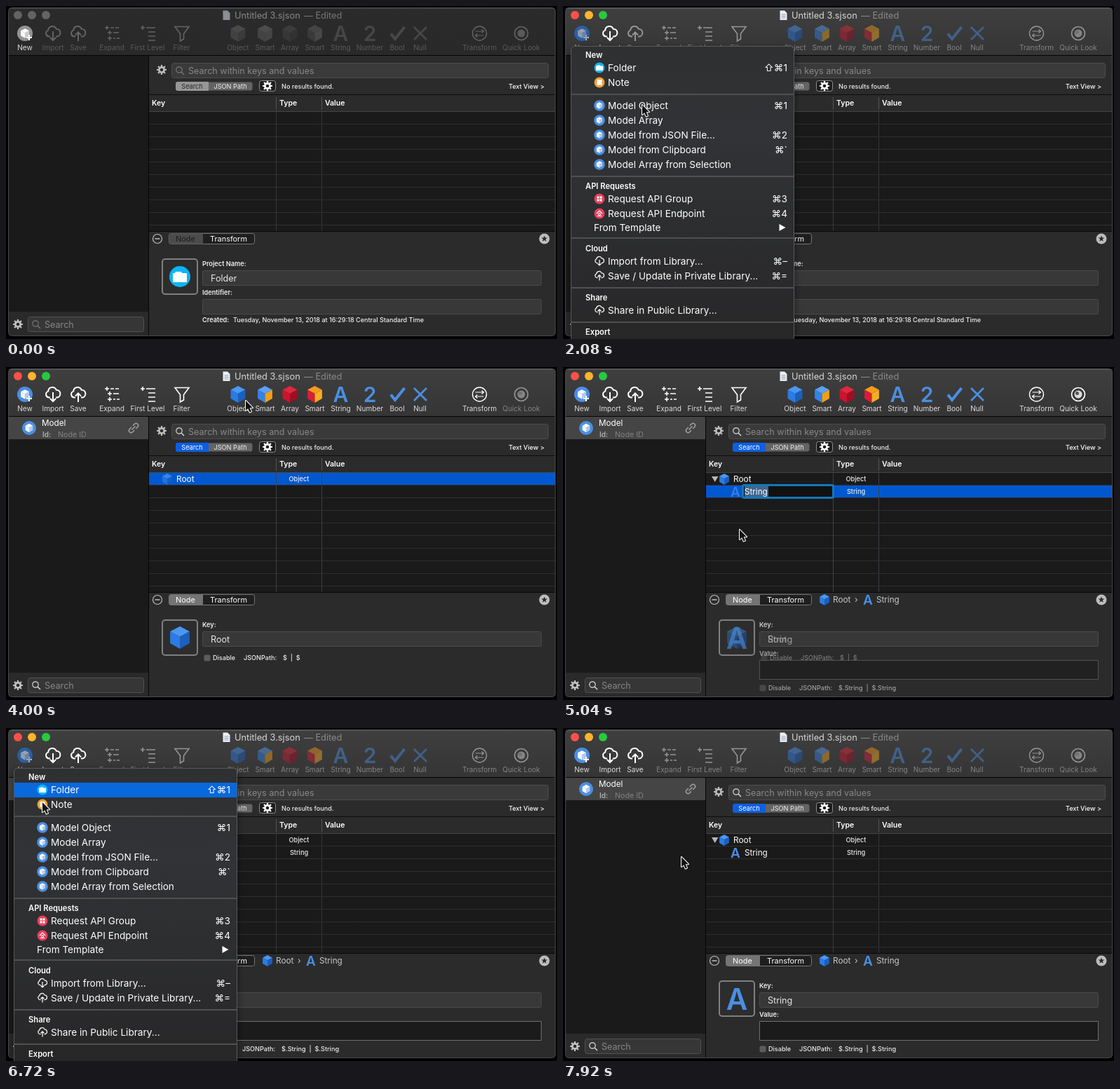
An HTML page with a canvas for the animation above (8000 ms loop, 786 px wide and 475 px high).

```html
<!DOCTYPE html>
<html lang="en">
<head>
<meta charset="utf-8">
<title>Tree editor</title>
<style>
html, body { margin: 0; width: 100%; height: 100%; overflow: hidden; background: #000; }
canvas { display: block; }
</style>
</head>
<body>
<canvas id="stage" width="786" height="475"></canvas>
<script>
const g = document.getElementById('stage').getContext('2d');
const LOOP = 8000, STEP = 80;
const FONT = 'Inter, "Noto Sans", "DejaVu Sans", sans-serif';
const BLUE = '#0058d0', SKY = '#4a8fe2', CYAN = '#0cb4f8';
const CUBES = {
  blue: ['#4a97f2', '#2b7be4', '#1c5fbd'],
  blueSmart: ['#5aa0f4', '#3482e8', '#f0a018'],
  red: ['#e0283a', '#cc1430', '#a30d24'],
  redSmart: ['#f59a1c', '#dc1c36', '#f4ae22'],
  white: ['#ffffff', '#f2f6fc', '#b4cbea']
};

// Cursor stops: time, x, y
const PATH = [
  [240, 244, 215], [320, 223, 175], [480, 223, 175], [800, 205, 158], [960, 195, 148],
  [1360, 34, 44], [1520, 31, 42], [1600, 31, 42], [1760, 60, 85], [2080, 113, 141],
  [2640, 113, 141], [3040, 268, 158], [3200, 268, 158], [3920, 342, 48], [4160, 342, 48],
  [4480, 477, 42], [4640, 477, 42], [4960, 252, 232], [5200, 252, 232], [5680, 102, 65],
  [5840, 98, 62], [6240, 31, 42], [6480, 31, 42], [6560, 40, 70], [6720, 52, 106],
  [7200, 181, 193], [7360, 181, 193], [7440, 169, 184], [8000, 169, 184]
];

const MENU = [
  { y: 70, head: 'New' },
  { y: 88, text: 'Folder', key: '⇧⌘1', icon: 'folder' },
  { y: 109, text: 'Note', icon: 'note' },
  { y: 126 },
  { y: 142, text: 'Model Object', key: '⌘1', icon: 'model' },
  { y: 163, text: 'Model Array', icon: 'model' },
  { y: 184, text: 'Model from JSON File...', key: '⌘2', icon: 'model' },
  { y: 205, text: 'Model from Clipboard', key: '⌘`', icon: 'model' },
  { y: 226, text: 'Model Array from Selection', icon: 'model' },
  { y: 243 },
  { y: 257, head: 'API Requests' },
  { y: 275, text: 'Request API Group', key: '⌘3', icon: 'group' },
  { y: 296, text: 'Request API Endpoint', key: '⌘4', icon: 'endpoint' },
  { y: 316, text: 'From Template', more: true },
  { y: 331 },
  { y: 346, head: 'Cloud' },
  { y: 364, text: 'Import from Library...', key: '⌘–', icon: 'down' },
  { y: 385, text: 'Save / Update in Private Library...', key: '⌘=', icon: 'up' },
  { y: 402 },
  { y: 416, head: 'Share' },
  { y: 434, text: 'Share in Public Library...', icon: 'up' },
  { y: 451 },
  { y: 465, head: 'Export' }
];

let active = true;
const clamp = v => Math.max(0, Math.min(1, v));
const ramp = (t, a, b) => clamp((t - a) / (b - a));

// Colours lose their hue while the window is inactive
function tint(hex) {
  if (active) return hex;
  const n = parseInt(hex.slice(1), 16);
  const v = Math.round(((n >> 16) + (n >> 8 & 255) + (n & 255)) / 3);
  return `rgb(${v},${v},${v})`;
}

function faded(alpha, draw) {
  if (alpha <= 0) return;
  g.save();
  g.globalAlpha *= alpha;
  draw();
  g.restore();
}

function at(x, y, scale, draw) {
  g.save();
  g.translate(x, y);
  g.scale(scale, scale);
  draw();
  g.restore();
}

function text(s, x, y, size, color = '#fff', weight = 400, align = 'left') {
  g.font = `${weight} ${size}px ${FONT}`;
  g.textAlign = align;
  g.fillStyle = color;
  g.fillText(s, x, y);
}

function rect(x, y, w, h, color) {
  g.fillStyle = color;
  g.fillRect(x, y, w, h);
}

function box(x, y, w, h, r, fill, stroke, width = 1) {
  g.beginPath();
  g.roundRect(x + 0.5, y + 0.5, w - 1, h - 1, r);
  if (fill) { g.fillStyle = fill; g.fill(); }
  if (stroke) { g.strokeStyle = stroke; g.lineWidth = width; g.stroke(); }
}

function disc(x, y, r, color) {
  g.beginPath();
  g.arc(x, y, r, 0, 7);
  g.fillStyle = color;
  g.fill();
}

function ring(x, y, r, color, width) {
  g.beginPath();
  g.arc(x, y, r, 0, 7);
  g.strokeStyle = color;
  g.lineWidth = width;
  g.stroke();
}

function shape(d, color) {
  g.fillStyle = color;
  g.fill(new Path2D(d));
}

function line(d, color, width) {
  g.strokeStyle = color;
  g.lineWidth = width;
  g.stroke(new Path2D(d));
}

function cube(x, y, r, kind) {
  const [top, left, right] = CUBES[kind].map(tint);
  at(x, y, r / 12, () => {
    shape('M0-12L10.4-6.5L0-1L-10.4-6.5Z', top);
    shape('M-10.4-6.5L0-1V12L-10.4 6Z', left);
    shape('M10.4-6.5L0-1V12L10.4 6Z', right);
  });
}

function cloud(x, y, scale, up) {
  at(x, y, scale, () => {
    line('M-4 6.5H-6A4.6 4.6 0 0 1-6.8-2.4A6 6 0 0 1 4.8-4.2A5.4 5.4 0 0 1 6 6.5H4', '#fff', 2);
    line(up ? 'M0 13V1M-4 4.5L0 0.5L4 4.5' : 'M0-1V11.5M-4 8L0 12L4 8', '#fff', 2);
  });
}

function gear(x, y, scale, color) {
  at(x, y, scale, () => {
    ring(0, 0, 3.7, color, 2.8);
    for (let i = 0; i < 8; i++) {
      g.rotate(Math.PI / 4);
      line('M0-4V-7', color, 2.2);
    }
  });
}

function lens(x, y, color) {
  ring(x - 1, y - 1, 4.2, color, 1.2);
  line(`M${x + 2} ${y + 2}L${x + 6} ${y + 6}`, color, 1.4);
}

function folder(x, y, r) {
  disc(x, y, r, CYAN);
  at(x, y, r / 15, () => shape('M-10-4Q-10-5-9-5H-7L-6-7H2L3-5H9Q10-5 10-4V7Q10 8 9 8H-9Q-10 8-10 7Z', '#fff'));
}

function model(x, y, r) {
  disc(x, y, r, tint(SKY));
  cube(x, y, r * 0.62, 'white');
}

function letterA(x, y, size) {
  text('A', x, y, size, tint(SKY), 600, 'center');
}

const plus = (x, y) => `M${x - 3} ${y}h6M${x} ${y - 3}v6`;

const TOOLS = [
  ['Import', 67, 'import', x => cloud(x, 37, 1, false)],
  ['Save', 103, 'save', x => cloud(x, 37, 1, true)],
  ['Expand', 151, 'node', () =>
    line(plus(144, 31) + plus(148, 38) + plus(148, 46) + 'M149 31h5M156 31h5M153 38h8M153 46h3M158 46h4', '#fff', 1.5)],
  ['First Level', 202, 'node', () =>
    line(plus(195, 31) + 'M200 31h13M203 37h10M203 43h10M203 49h10', '#fff', 1.6)],
  ['Filter', 250.5, 'node', () => line('M241 29.5H261L253.500 39.500V47L248.500 50V39.500Z', '#fff', 1.6)],
  ['Object', 331, 'node', x => cube(x, 39, 12, 'blue')],
  ['Smart', 369.5, 'node', x => cube(x, 39, 12, 'blueSmart')],
  ['Array', 405, 'node', x => cube(x, 39, 12, 'red')],
  ['Smart', 440.5, 'node', x => cube(x, 39, 12, 'redSmart')],
  ['String', 477.5, 'node', x => letterA(x, 50, 30)],
  ['Number', 519, 'node', x => text('2', x, 50, 30, tint(SKY), 600, 'center')],
  ['Bool', 558, 'node', () => line('M549 39.500L555 47L568.500 30', tint(SKY), 4)],
  ['Null', 590.5, 'node', () => line('M582 30L600 48M600 30L582 48', tint(SKY), 2.8)],
  ['Transform', 675.5, 'node', x => {
    ring(x, 39, 10, '#fff', 1.4);
    line(`M${x - 6} 36h12m-3-2.500l3 2.500l-3 2.500M${x + 6} 42h-12m3-2.500l-3 2.500l3 2.500`, '#fff', 1.2);
  }],
  ['Quick Look', 735, 'quick', x => {
    ring(x, 39, 9.5, '#fff', 1.7);
    disc(x, 39, 5.5, '#ddd');
    disc(x - 1.5, 37.5, 2.5, '#555');
  }]
];

function toolbar(s) {
  const sky = g.createLinearGradient(0, 3, 0, 70);
  sky.addColorStop(0, active ? '#3f3f3f' : '#2b2b2b');
  sky.addColorStop(1, active ? '#353535' : '#292929');
  rect(4, 3, 780, 67, sky);
  rect(4, 3, 780, 1, active ? '#5b5b5b' : '#414141');
  ['#ff5048', '#fdb42c', '#28c941'].forEach((c, i) => disc(17 + 20 * i, 13, 6, active ? c : '#636363'));

  faded(active ? 1 : 0.5, () => {
    shape('M309.500 6.500H316L319.500 10V20H309.500Z', '#eceff3');
    line('M311.500 12h6M311.500 14.500h6M311.500 17h6', '#8c9bb0', 1);
  });
  text('Untitled 3.sjson', 326, 18, 12.8, active ? '#d6d6d6' : '#888');
  text('— Edited', 425, 18, 12.8, active ? '#8a8a8a' : '#777');

  model(27, 39, 11);
  line('M29 45h8M33 41v8', '#fff', 2);
  if (s.pressed) disc(27, 39, 11.3, 'rgba(0,20,60,.4)');
  text('New', 27, 63, 10.1, s.pressed ? '#999' : '#dcdcdc', 400, 'center');
  for (const [name, x, group, icon] of TOOLS) {
    faded(s[group] ? 1 : active ? 0.46 : 0.27, () => {
      icon(x);
      text(name, x, 63, 10.1, '#dedede', 400, 'center');
    });
  }
}

function sidebar(s) {
  rect(4, 71, 199, 365, '#1a1a1a');
  rect(4, 436, 199, 34, '#2a2a2a');
  gear(17, 454, 1, '#c2c2c2');
  box(31, 443, 166, 22, 3, '#363636', '#515151');
  lens(43, 454, active ? '#ddd' : '#777');
  text('Search', 55, 459, 12.6, '#868686');
  if (!s.model) return;

  rect(4, 71, 199, 32, s.naming ? BLUE : '#454545');
  model(33, 87, 10);
  if (s.naming) {
    rect(50, 71, 122, 16, '#101010');
    rect(51, 72, 35, 15, '#46688f');
  }
  text('Model', 51, 84, 11.7);
  text('Id:', 52, 100, 10, s.naming ? '#b9d2f5' : '#b0b0b0', 600);
  text('Node ID', 74, 100, 10.7, s.naming ? '#2f74d4' : '#808080');
  at(182, 87, 1, () => {
    g.rotate(-Math.PI / 4);
    const c = s.naming ? '#fff' : '#a0a0a0';
    line('M-1.500-3H-5A3 3 0 0 0-5 3H-1.500M1.500-3H5A3 3 0 0 1 5 3H1.500M-3.500 0H3.500', c, 1.5);
  });
}

function searchArea() {
  rect(204, 71, 580, 399, '#2b2b2b');
  gear(222, 91, 1, '#bcbcbc');
  box(236, 81, 538, 22, 3, '#3a3a3a', '#4d4d4d');
  lens(248, 92, active ? '#ddd' : '#777');
  text('Search within keys and values', 260, 97, 12.6, '#888');
  box(242, 108, 110, 13, 3, '#646464');
  g.beginPath();
  g.roundRect(242, 108, 47, 13, [3, 0, 0, 3]);
  g.fillStyle = active ? '#0d5fe0' : '#969696';
  g.fill();
  text('Search', 265.5, 117.5, 9.2, active ? '#fff' : '#2a2a2a', 400, 'center');
  text('JSON Path', 320, 117.5, 9.2, '#eee', 400, 'center');
  box(361, 106, 24, 16, 3, '#1d1d1d', '#8d8d8d');
  gear(373, 114, 1, '#fff');
  text('No results found.', 393, 118, 9.1, '#eee', 500);
  text('Text View >', 768, 118, 9.1, '#fff', 500, 'right');
}

function typeCell(s, y) {
  text(s, 418, y, 9.2, '#eee', 500, 'center');
}

function table(s) {
  rect(204, 126, 580, 1, '#0c0c0c');
  text('Key', 208, 142, 10.5, '#fff', 600);
  text('Type', 390, 142, 10.5, '#fff', 600);
  text('Value', 455, 142, 10.5, '#fff', 600);
  rect(204, 151, 580, 170, '#1a1a1a');
  rect(204, 150, 580, 1, '#454545');
  g.setLineDash([1, 1]);
  for (let y = 168.5; y < 320; y += 18) line(`M204 ${y}H784`, '#424242', 1);
  g.setLineDash([]);
  if (s.rootPicked) rect(204, 151, 580, 17, BLUE);
  if (s.stringPicked) rect(204, 169, 580, 17, BLUE);
  for (const x of [385, 450]) {
    rect(x, 130, 1, 18, '#555');
    rect(x, 151, 1, 170, s.rootPicked || s.stringPicked ? '#3c4048' : '#373737');
  }

  if (s.model) {
    faded(s.rootPicked ? 0.75 : 1, () => cube(230, 160, 8, 'blue'));
    text('Root', 243, 164, 11.9);
    typeCell('Object', 163);
  }
  if (!s.string) return;
  shape('M212 156H221.500L216.750 164Z', '#b5b5b5');
  faded(s.stringPicked ? 0.7 : 1, () => letterA(246, 185, 19));
  if (s.stringPicked) {
    box(256, 168, 130, 19, 2, '#111', '#1478b8', 3);
    rect(259, 170, 34, 15, '#41668e');
  }
  text('String', 259, 182, 11.7);
  typeCell('String', 181);
}

function disableRow(x, y, path) {
  box(x, y - 8, 10, 10, 2, '#5c5c5c');
  text('Disable', x + 13, y, 9.1, '#eee', 500);
  text('JSONPath:', x + 57, y, 9.1, '#eee', 500);
  text(path, x + 113, y, 9.1, '#eee', 500);
}

const label = (s, y) => text(s, 280, y, 9.2, '#f0f0f0', 600);
const fieldText = s => text(s, 292, 393, 12.6, '#e6e6e6');

const PANELS = {
  folder() {
    folder(248, 386, 15);
    label('Project Name:', 371);
    fieldText('Folder');
    label('Identifier:', 412);
    box(280, 418, 484, 22, 2, '#383838', '#4b4b4b');
    label('Created:', 451);
    text('Tuesday, November 13, 2018 at 16:29:18 Central Standard Time', 324, 451, 9.05, '#f0f0f0', 500);
  },
  root() {
    cube(248, 386, 16, 'blue');
    label('Key:', 371);
    fieldText('Root');
    disableRow(282, 418, '$  |  $');
  },
  string() {
    letterA(248, 402, 42);
    label('Key:', 371);
    fieldText('String');
    label('Value:', 412);
    box(280, 418, 484, 28, 0, '#1b1b1b', '#707070');
    disableRow(280, 461, '$.String  |  $.String');
  }
};

function inspector(s, t) {
  rect(204, 321, 580, 1, '#080808');
  ring(216, 332, 6.5, '#bdbdbd', 1.2);
  line('M212.500 332h7', '#bdbdbd', 1.3);
  box(232, 324, 123, 16, 3, '#1f1f1f', '#777');
  g.beginPath();
  g.roundRect(232.5, 324.5, 48.5, 15, [3, 0, 0, 3]);
  g.fillStyle = active ? '#747474' : '#4c4c4c';
  g.fill();
  text('Node', 256, 336, 10.9, active ? '#fff' : '#1c1c1c', 400, 'center');
  text('Transform', 317.5, 336, 10.9, '#fff', 400, 'center');
  disc(768, 332, 7.5, '#bdbdbd');
  at(768, 332, 1, () => {
    g.beginPath();
    for (let i = 0; i < 10; i++) {
      const r = i % 2 ? 1.9 : 4.7, a = i * Math.PI / 5;
      g.lineTo(r * Math.sin(a), -r * Math.cos(a));
    }
    g.fillStyle = '#2b2b2b';
    g.fill();
  });
  if (s.string) {
    cube(373, 332, 8, 'blue');
    text('Root', 385, 336, 11.8, '#c8c8c8');
    text('›', 416, 336, 12, '#c8c8c8');
    letterA(435, 339, 19);
    text('String', 447, 336, 11.7, '#c8c8c8');
  }

  box(222.5, 360.5, 51, 51, 4, '#2d2d2d', '#808080', 2);
  box(280, 377, 484, 22, 2, '#383838', '#4b4b4b');
  const toRoot = ramp(t, 3120, 3440), toString = ramp(t, 4800, 5200);
  faded(1 - toRoot, PANELS.folder);
  faded(toRoot * (1 - toString), PANELS.root);
  faded(toString, PANELS.string);
}

function menuIcon(kind, y) {
  const x = 52;
  if (kind === 'folder') folder(x, y, 7.5);
  else if (kind === 'model') model(x, y, 7.8);
  else if (kind === 'down' || kind === 'up') cloud(x, y - 1.5, 0.62, kind === 'up');
  else if (kind === 'note') {
    disc(x, y, 7.5, '#f0a030');
    rect(x - 3.5, y - 4, 7, 8, '#fff');
  } else {
    disc(x, y, 7.5, '#e8405c');
    if (kind === 'group') {
      for (const [dx, dy] of [[-3.5, -3.5], [0.5, -3.5], [-3.5, 0.5], [0.5, 0.5]]) rect(x + dx, y + dy, 3, 3, '#fff');
    } else {
      line(`M${x - 4} ${y}L${x} ${y - 4}L${x + 4} ${y}M${x - 3} ${y + 3.5}h6`, '#fff', 1.1);
      ring(x, y + 1, 1.5, '#fff', 1);
    }
  }
}

function menu(hoverY) {
  const bg = g.createLinearGradient(0, 57, 0, 475);
  bg.addColorStop(0, '#2f3031');
  bg.addColorStop(0.3, '#323336');
  bg.addColorStop(1, '#272728');
  g.save();
  g.shadowColor = 'rgba(0,0,0,.5)';
  g.shadowBlur = 12;
  g.shadowOffsetY = 4;
  box(11, 57, 319, 440, 5, bg);
  g.restore();
  box(11, 57, 319, 440, 5, null, '#5a5a5c');
  for (const m of MENU) {
    if (m.head) text(m.head, 32, m.y + 4, 11.2, '#fff', 600);
    else if (!m.text) rect(12, m.y - 1, 317, 2, '#505052');
    else {
      if (Math.abs(m.y - hoverY) <= 10.5) rect(12, m.y - 10, 317, 21, '#0868dc');
      if (m.icon) menuIcon(m.icon, m.y);
      text(m.text, m.icon ? 64 : 44, m.y + 5, 13.6);
      if (m.key) text(m.key, 320, m.y + 5, 13.6, '#fff', 400, 'right');
      if (m.more) shape(`M308.500 ${m.y - 5}L317.500 ${m.y}L308.500 ${m.y + 5}Z`, '#fff');
    }
  }
}

function cursorAt(t) {
  let i = PATH.findIndex(p => p[0] > t);
  if (i < 0) i = PATH.length - 1;
  if (i === 0) return [PATH[0][1], PATH[0][2]];
  const [t0, x0, y0] = PATH[i - 1], [t1, x1, y1] = PATH[i];
  const k = ramp(t, t0, t1);
  return [x0 + (x1 - x0) * k, y0 + (y1 - y0) * k];
}

function pointer([x, y]) {
  const d = 'M0 0V14L3.200 11.200L5.600 16.600L8 15.600L5.700 10.200H10Z';
  at(x, y, 1, () => {
    g.lineJoin = 'round';
    line(d, '#fff', 2);
    shape(d, '#111');
  });
}

function render(t) {
  const within = (a, b) => t >= a && t < b;
  active = t >= 480;
  const s = {
    pressed: within(1520, 2400) || within(6320, 7680),
    import: active,
    save: t >= 3120,
    node: within(3120, 5200),
    quick: within(4640, 5200),
    model: t >= 2480,
    naming: within(2480, 3120),
    rootPicked: within(3120, 4640),
    string: t >= 4640,
    stringPicked: within(4640, 5200)
  };
  rect(0, 0, 786, 475, '#000');
  g.save();
  g.beginPath();
  g.roundRect(3, 2, 781, 469, 5);
  g.clip();
  toolbar(s);
  rect(3, 70, 781, 1, '#050505');
  searchArea();
  table(s);
  inspector(s, t);
  rect(203, 71, 1, 400, '#050505');
  sidebar(s);
  g.restore();
  box(3, 2, 781, 469, 5, null, '#4a4a4a');

  const shown = t < 4000 ? (t >= 1600) * (1 - ramp(t, 2400, 2640)) : (t >= 6480) * (1 - ramp(t, 7680, 7920));
  const blink = t === 2240 || t === 7600;
  faded(shown, () => menu(blink ? -99 : cursorAt(t - STEP)[1]));
  if (t >= 240) pointer(cursorAt(t));
}

function tick() {
  const t = performance.now() % LOOP;
  render(Math.floor(t / STEP) * STEP);
  requestAnimationFrame(tick);
}
tick();
</script>
</body>
</html>
```
